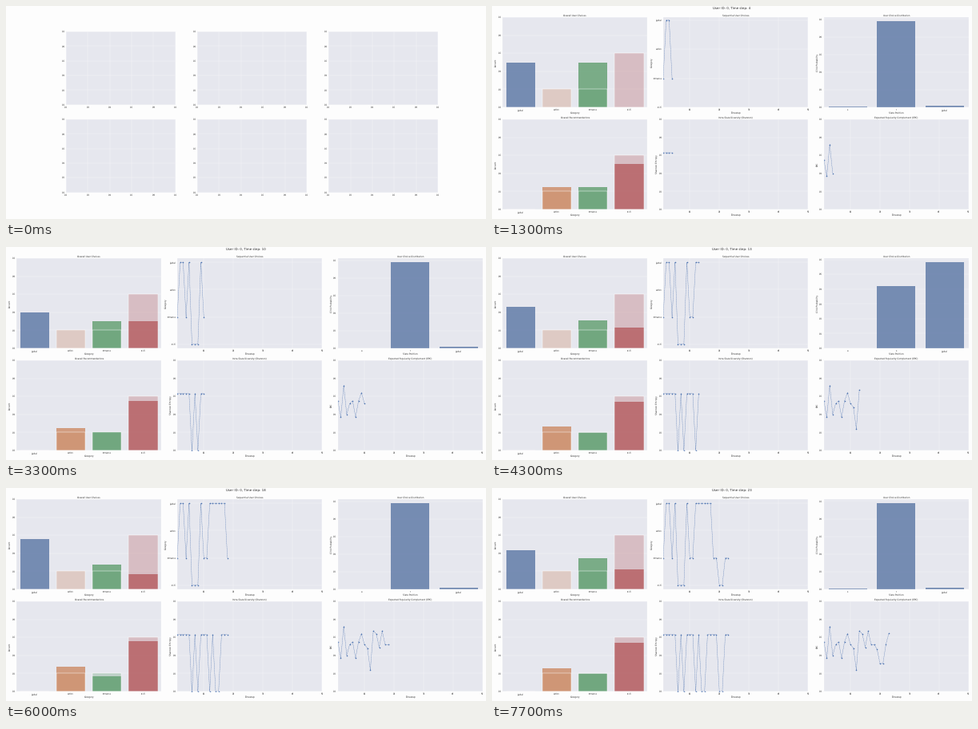
These frames come from a looping animation (600 px wide and 267 px high, 8 s). A matplotlib script:

```python
import matplotlib.pyplot as plt
from matplotlib.animation import FuncAnimation
from matplotlib.colors import to_rgba

WIDTH, HEIGHT, DPI = 600, 267, 100
PT = 1 / 6  # type and lines are sized for a 36 inch wide figure

plt.rcParams.update({
    "font.family": "DejaVu Sans", "text.hinting": "none",
    "text.color": "0.15", "axes.labelcolor": "0.15",
    "xtick.color": "0.15", "ytick.color": "0.15",
    "figure.facecolor": "#fdfdfd", "axes.facecolor": "#e6e7ee",
    "axes.edgecolor": "white", "axes.linewidth": 1.25 * PT,
    "axes.grid": True, "axes.axisbelow": True,
    "grid.color": "white", "grid.linewidth": 1.2 * PT,
    "axes.titlesize": 12 * PT, "axes.titlepad": 6 * PT,
    "axes.labelsize": 12 * PT, "axes.labelpad": 4 * PT,
    "xtick.labelsize": 11 * PT, "ytick.labelsize": 11 * PT,
    "xtick.major.size": 0, "ytick.major.size": 0,
    "xtick.major.pad": 7 * PT, "ytick.major.pad": 7 * PT,
})

CATEGORIES = ["global", "action", "romance", "sci-fi"]
COLORS = ["#5975a4", "#cc8963", "#5f9e6e", "#b55d60"]
LETTERS = "garS"
PREFERENCE = [0, 0.2, 0.2, 0.6]

# One entry per timestep. "s" and "S" are two sci-fi items, "g" is no pick.
CHOICES = "rggrgSSSgrrggggggrrSSrr"
SLATES = ("Sr as aS Sr as sS as sS Sr ar ra sS "
          "as sS Ss aS as ar ra sS sS ar Sr").split()
APPEAL = {"a": 0, "r": 52, "s": 0.724, "S": 0.436}
EPC = [0.55, 0.37, 0.72, 0.40, 0.52, 0.55, 0.37, 0.55, 0.64, 0.52, 0.48, 0.24,
       0.67, 0.64, 0.49, 0.67, 0.52, 0.52, 0.47, 0.31, 0.31, 0.52, 0.645]
ENTROPY = [0.63 if a.lower() != b.lower() else 0 for a, b in SLATES]

EMPTY_LAYOUT = dict(left=0.125, right=0.9, bottom=0.125, top=0.88,
                    wspace=0.2, hspace=0.2)
FULL_LAYOUT = dict(left=13.2 / WIDTH, right=595.8 / WIDTH,
                   bottom=12 / HEIGHT, top=253 / HEIGHT,
                   wspace=0.1094, hspace=0.1327)

fig, axes = plt.subplots(2, 3, figsize=(WIDTH / DPI, HEIGHT / DPI), dpi=DPI)
heading = fig.text(0.5, 1 - 3.6 / HEIGHT, "", ha="center", va="baseline",
                   fontsize=17.28 * PT)
shown = {"step": None}


def label(ax, title, xlabel, ylabel):
    ax.set(title=title, xlabel=xlabel, ylabel=ylabel)


def draw_shares(ax, picks):
    letters = picks.replace("s", "S")
    shares = [letters.count(c) / len(letters) for c in LETTERS]
    ax.bar(range(4), shares, 0.8, color=COLORS, alpha=0.8, linewidth=0)
    ax.bar(range(4), PREFERENCE, 0.8, color=[to_rgba(c, 0.3) for c in COLORS],
           edgecolor="white", linewidth=0.33)
    ax.set_xticks(range(4), CATEGORIES)
    ax.set(xlim=(-0.5, 3.5), ylim=(0, 1))
    ax.xaxis.grid(False)


def draw_series(ax, values):
    ax.plot(range(1, len(values) + 1), values, "--o", color="#4c72b0",
            linewidth=1.75 * PT, markersize=7 * PT, markeredgewidth=0)
    ax.set(xlim=(1, 50), ylim=(0, 1))


def draw_sequence(ax, picks):
    levels = [3 - LETTERS.index(c) for c in picks]
    draw_series(ax, levels)
    ax.set_yticks(range(4), CATEGORIES[::-1])
    span = max(levels) - min(levels)
    margin = 0.05 * span
    ax.set_ylim(min(0, min(levels) - margin), 3 + margin)


def draw_slate(ax, slate):
    weights = [APPEAL[item] for item in slate] + [1]
    probabilities = [w / sum(weights) for w in weights]
    ax.bar(range(3), probabilities, 0.8, color=COLORS[0], alpha=0.8,
           linewidth=0)
    ax.set_xticks(range(3), [*slate.lower(), "global"])
    ax.set(xlim=(-0.5, 2.5), ylim=(0, 1.05 * max(probabilities)))
    ax.xaxis.grid(False)


def show_step(step):
    for ax in axes.flat:
        ax.clear()
    fig.subplots_adjust(**(FULL_LAYOUT if step else EMPTY_LAYOUT))
    heading.set_text(f"User ID: 0, Time step: {step}" if step else "")
    if not step:
        return
    (chosen, sequence, slate), (offered, diversity, novelty) = axes

    draw_shares(chosen, CHOICES[:step])
    label(chosen, "Overall User Choices", "Category", "Percent")
    draw_sequence(sequence, CHOICES[:step])
    label(sequence, "Sequential User Choices", "Timestep", "Category")
    draw_slate(slate, SLATES[step - 1])
    label(slate, "User Choice Distribution", "Slate Position",
          "Click Probability")

    draw_shares(offered, "".join(SLATES[:step]))
    label(offered, "Overall Recommendations", "Category", "Percent")
    draw_series(diversity, ENTROPY[:step])
    label(diversity, "Intra-Slate Diversity (Shannon)", "Timestep",
          "Shannon Entropy")
    draw_series(novelty, EPC[:step])
    label(novelty, "Expected Popularity Complement (EPC)", "Timestep", "EPC")


def update(frame):
    step = (3 * frame + 1) // 10  # three steps a second, on a 100 ms clock
    if step != shown["step"]:
        show_step(step)
        shown["step"] = step
    return []


animation = FuncAnimation(fig, update, frames=80, interval=100,
                          init_func=lambda: [], repeat=True, repeat_delay=0)
plt.show()
```
